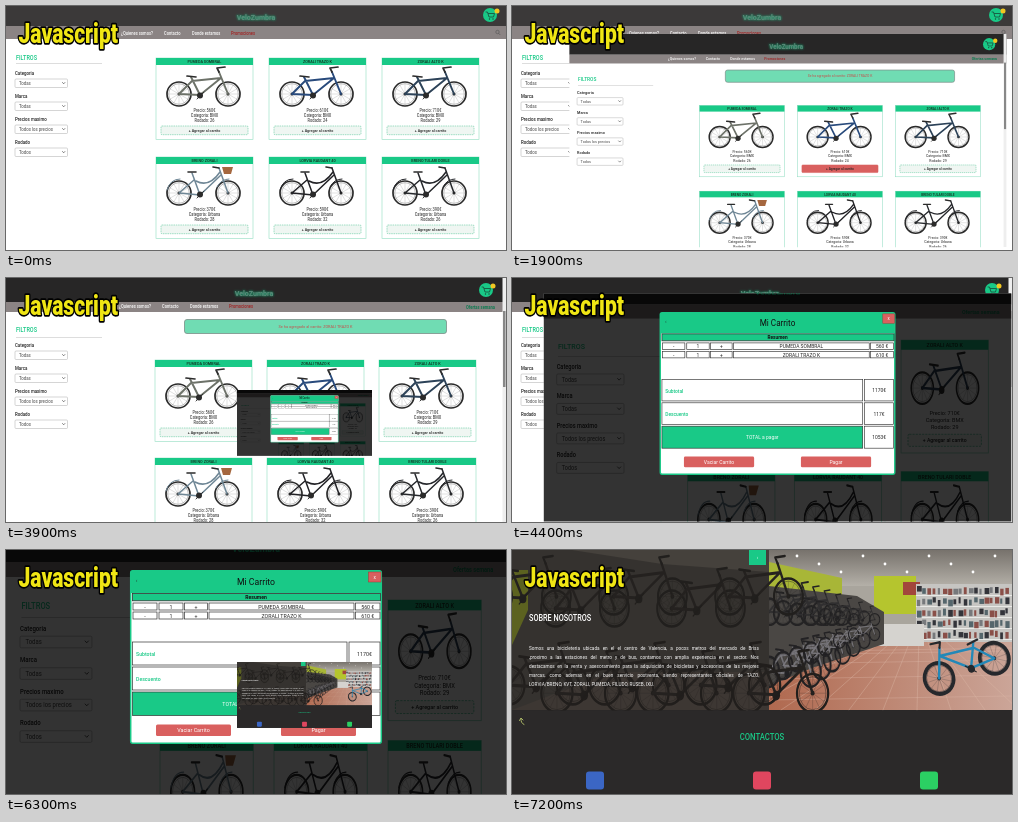
Write an HTML page that moves like this. It is 500 px wide and 244 px high and loops after 8 s.

```html
<!DOCTYPE html>
<html lang="es">
<head>
<meta charset="utf-8">
<title>Javascript</title>
<style>
html, body { margin: 0; width: 100%; height: 100%; overflow: hidden; background: #fff; }
#stage { display: block; width: 100vw; height: 100vh; }
#stage, #stage div { font-family: Roboto, "Liberation Sans", sans-serif; }
.about div { color: #fff; font-size: 5.3px; line-height: 9px; white-space: nowrap; text-align: justify; text-align-last: justify; }
.about div:last-child { text-align-last: left; }
</style>
</head>
<body>
<svg id="stage" viewBox="0 0 500 244"></svg>
<script>
const GREEN = '#19c987', RED = '#d9605f', INK = '#222', CONDENSED = 0.88;
const BRAND = 'VeloZumbra';

const rect = (x, y, w, h, fill, more = '') =>
  `<rect x="${x}" y="${y}" width="${w}" height="${h}" fill="${fill}" ${more}/>`;
const path = (d, stroke, width = 1, fill = 'none') =>
  `<path d="${d}" fill="${fill}" stroke="${stroke}" stroke-width="${width}" stroke-linecap="round" stroke-linejoin="round"/>`;
const shape = (d, fill) => `<path d="${d}" fill="${fill}"/>`;
const circle = (x, y, r, fill, more = '') => `<circle cx="${x}" cy="${y}" r="${r}" fill="${fill}" ${more}/>`;
const text = (x, y, size, str, fill = INK, anchor = 'start', weight = 400) =>
  `<text transform="translate(${x} ${y}) scale(${CONDENSED} 1)" font-size="${size}" fill="${fill}" text-anchor="${anchor}" font-weight="${weight}">${str}</text>`;
const mid = (x, y, size, str, fill, weight) => text(x, y, size, str, fill, 'middle', weight);
const group = (transform, body, more = '') => `<g transform="${transform}" ${more}>${body}</g>`;
const range = (n, f) => Array.from({ length: n }, (_, i) => f(i)).join('');

let seed = 7;
const random = () => (seed = seed * 16807 % 2147483647) / 2147483647;

const items = [
  ['PUMEDA SOMBRAL', 560, 'BMX', 26, '#6d7269'],
  ['ZORALI TRAZO K', 610, 'BMX', 24, '#284a7c'],
  ['ZORALI ALTO K', 710, 'BMX', 29, '#2c4258'],
  ['BRENO ZORALI', 370, 'Urbana', 28, '#6f8796'],
  ['LORVIA RAUDANT 40', 590, 'Urbana', 32, '#222226'],
  ['BRENO TULARI DOBLE', 390, 'Urbana', 26, '#26282c']
];

// Bicycle facing right, about 76 x 40 units
function bike(x, y, color, kind = 'BMX', sx = 1, sy = sx, tyre = '#2b2b2b', tread = 1.7) {
  const city = kind != 'BMX';
  const wheel = cx => circle(cx, 27, 12, 'none', `stroke="${tyre}" stroke-width="${tread}"`) +
    circle(cx, 27, 10.3, 'none', `stroke="${tyre}" stroke-width=".3"`) +
    range(6, i => {
      const a = i * Math.PI / 6, c = 10 * Math.cos(a), s = 10 * Math.sin(a);
      return path(`M${cx - c} ${27 - s}L${cx + c} ${27 + s}`, tyre, 0.15);
    }) + circle(cx, 27, 1.5, tyre);
  const frame = city
    ? path('M13 27L34 29L55 9M13 27L28 14M26 7L34 29M30 15Q43 22 54 6M53 2L62 27', color, 1.5) +
      path('M1 24Q4 13 14 13M51 21Q55 13 63 13', color, 1) +
      path('M53 2L47 1M22 6H30', tyre, 1.6)
    : path('M13 27L34 28L55 11L26 14ZM25 10L34 28M53 5L62 27', color, 1.9) +
      path('M53 5L51 1L59 0M21 9L30 10', tyre, 1.7);
  return group(`translate(${x} ${y}) scale(${sx} ${sy})`,
    wheel(13) + wheel(62) + frame + circle(34, 28.5, 3, tyre) +
    path('M31 32L38 25', tyre, 0.9));
}

function card(x, y, w, n, hot) {
  const [name, price, kind, size, color] = items[n], c = x + w / 2;
  const fit = Math.min(1, (w - 19) / 66), tall = fit < 1 ? 0.95 : 1;
  return rect(x, y, w, 81.5, '#fff', 'stroke="#8fdcc0" stroke-width=".6"') +
    rect(x, y, w, 7, GREEN) + mid(c, y + 5.1, 4.3, name, '#12301f', 500) +
    bike(x + 10 * fit, y + 9, color, kind, fit, tall) +
    (n == 3 ? shape(`M${x + 10 * fit + 56 * fit} ${y + 10}h${11 * fit}l-2 7h${-7 * fit}z`, '#a5673f') : '') +
    mid(c, y + 54.3, 4.5, `Precio: ${price}€`) +
    mid(c, y + 59.4, 4.5, `Categoria: ${kind}`) +
    mid(c, y + 64.4, 4.5, `Rodado: ${size}`) +
    rect(x + 5, y + 68, w - 10, 8.7, hot ? RED : '#eff6f2', `rx="1" stroke="${hot ? RED : '#62c9a0'}" stroke-width=".6" ${hot ? '' : 'stroke-dasharray="1.5 .8"'}`) +
    mid(c, y + 73.9, 4.2, '+ Agregar al carrito', INK, 500);
}

const filters = lineY => text(10, 53.5, 6.3, 'FILTROS', GREEN, 'start', 500) +
  rect(10, lineY, 86, 0.5, '#bbb') +
  ['Categoria', 'Marca', 'Precios maximo', 'Rodado'].map((label, i) => {
    const y = 69 + i * 23;
    return text(9, y, 5, label, INK, 'start', 500) +
      rect(9, y + 4, 52.5, 8.5, '#fff', 'rx="1" stroke="#aaa" stroke-width=".5"') +
      text(13, y + 10, 4.9, ['Todas', 'Todas', 'Todos los precios', 'Todos'][i], '#444') +
      path(`M56.5 ${y + 7.5}l1.2 1.3l1.2 -1.3`, '#333', 0.6);
  }).join('');

const header = (split, bottom, logoX, cartX, cartY, dark) =>
  rect(0, 0, 500, split, dark) + rect(0, split, 500, bottom - split, '#8b8484') +
  `<g filter="url(#glow)">${mid(logoX, split - 6, 8, BRAND, GREEN, 700)}</g>` +
  mid(logoX, split - 6, 8, BRAND, '#5b8a7a', 700) +
  ['¿Quienes somos?', 'Contacto', 'Donde estamos', 'Promociones'].map((s, i) =>
    text([115, 158, 186, 225][i] + logoX - 250, bottom - 4, 4.6, s, i < 3 ? '#fff' : '#a11f1f', 'start', 500)).join('') +
  circle(cartX, cartY, 7, GREEN) +
  path(`M${cartX - 4} ${cartY - 3}h1.5l1.5 5h4.5l1 -3.5h-6`, '#174a38', 0.8) +
  circle(cartX - 0.5, cartY + 4, 0.7, '#174a38') + circle(cartX + 3, cartY + 4, 0.7, '#174a38') +
  circle(cartX + 7, cartY - 4, 2.5, '#f2c722');

function shop() {
  return rect(0, 0, 500, 244, '#fff') + header(20, 33, 250, 484, 9, '#3b3939') +
    circle(491.5, 26, 1.7, 'none', 'stroke="#555" stroke-width=".6"') + path('M492.8 27.5l1.2 1.2', '#555', 0.6) +
    filters(57) + range(6, i => card(150 + i % 3 * 113, i < 3 ? 52 : 151, 97, i));
}

function added() {
  return rect(0, 0, 500, 244, '#fff') + header(24, 34, 248, 480, 12, '#272626') +
    text(460, 30.5, 4.6, 'Ofertas semana', '#0d7a50', 'start', 700) +
    rect(496.5, 0, 3.5, 244, '#eee') + rect(497, 33, 2.5, 76, '#888') +
    rect(178.5, 41.5, 262, 14, '#70dcb3', 'rx="2.5" stroke="#7c8f88" stroke-width=".8"') +
    mid(309.5, 50, 4.4, `Se ha agregado al carrito: ${items[1][0]}`, '#c4504c') +
    filters(59) + range(6, i => card(149 + i % 3 * 112, i < 3 ? 82 : 180, 97, i, i == 1));
}

function cart() {
  const cell = (x, y, w, h, str, size, fill = '#fff', ink = INK) =>
    rect(x, y, w, h, fill, 'stroke="#333" stroke-width=".7"') + mid(x + w / 2, y + h / 2 + size * 0.35, size, str, ink);
  const row = (y, n) => [[127, 24, '-'], [153, 24, '1'], [178.5, 23, '+'], [203, 145, items[n][0]], [349.5, 24.5, items[n][1] + ' €']]
    .map(([x, w, s]) => cell(x, y, w, 7, s, 6)).join('');
  const sum = (y, label, value) => cell(126.5, y, 214.5, 23, '', 6) +
    text(130, y + 14, 5.9, label, GREEN, 'start', 500) + cell(343, y, 31, 23, value, 6);
  const button = (x, s) => rect(x, 174.5, 75, 11.5, RED, 'rx="1.5"') + mid(x + 37.5, 182.4, 6.1, s, '#fff');
  const page = rect(0, 0, 500, 244, '#fff') + rect(0, 0, 500, 12, '#272626') + rect(0, 12, 500, 15, '#8b8484') +
    mid(250, 2, 10, BRAND, GREEN, 700) + text(447, 22, 6.4, 'Ofertas semana', '#0d7a50', 'start', 700) +
    group('translate(1.7 -13.8) scale(1.37)', filters(59)) +
    range(6, i => group(`translate(${154 + i % 3 * 114} ${i < 3 ? 50 : 190.5}) scale(1.48)`, card(0, 0, 63, i)));
  return page + rect(0, 0, 500, 244, '#000', 'opacity=".8"') +
    rect(124.7, 20.7, 250.6, 172.6, '#fff', `rx="2" stroke="${GREEN}" stroke-width="1.5"`) +
    rect(125, 21, 250, 22, GREEN) + mid(250, 35, 9.9, 'Mi Carrito', '#111') + text(130, 32, 5, '‹') +
    rect(362.5, 22, 12.5, 10, RED, 'stroke="#a33" stroke-width=".5"') + mid(368.7, 29, 5.5, 'x', '#fff') +
    rect(126.5, 43.4, 248, 7.4, GREEN, 'stroke="#333" stroke-width=".8"') + mid(250, 49.1, 5.8, 'Resumen', '#111', 700) +
    row(53, 0) + row(62, 1) + sum(92, 'Subtotal', '1170€') + sum(117, 'Descuento', '117€') +
    cell(126.5, 142, 214.5, 23.5, 'TOTAL a pagar', 6, GREEN, '#fff') + cell(343, 142, 31, 23.5, '1053€', 6) +
    button(150, 'Vaciar Carrito') + button(275, 'Pagar');
}

function about() {
  const left = rect(0, 0, 257, 160, '#35322f') + shape('M0 20H16V60L0 95Z', '#5c6220') +
    shape('M60 0H257V22L150 14Z', '#45413c') + shape('M0 160L100 122H257V160Z', '#3d3733') +
    range(5, i => bike(-30 + i * 58, 6 + i % 2 * 12, '#24211f', 'BMX', 1.2, 1.5, '#211f1d')) +
    range(6, i => bike(-20 + i * 48, 92 + i % 2 * 8, '#24211f', 'BMX', 1.3, 1.6, '#211e1c'));
  const right = rect(257, 0, 243, 160, '#a9a59d') + rect(257, 0, 243, 36, 'url(#ceiling)') +
    shape('M257 12L330 28V45L257 42Z', '#a8b637') + rect(362, 26, 42, 38, '#b5c52e') + rect(391, 32, 17, 13, '#a2463c') +
    range(10, i => circle(285 + i * 22, 6 + i % 3 * 8, 1.4, '#fff')) +
    shape('M257 118L350 84L500 90V160H257Z', 'url(#floor)') +
    range(9, i => path(`M${372 + i * 7} 86L${235 + i * 34} 160`, '#dcb8a8', 0.4)) +
    range(5, i => path(`M257 ${102 + i * i * 3}L500 ${98 + i * i * 3}`, '#dcb8a8', 0.35)) +
    rect(404, 34, 96, 58, '#c6c5c2') +
    range(5, r => rect(404, 45 + r * 11, 96, 1, '#e9e9e6') +
      range(18, i => rect(405 + i * 5.2, 36 + r * 11 + random() * 3, 2 + random() * 3, 5 + random() * 2, ['#33343a', '#77797c', '#8a4f48', '#55666c'][random() * 4 | 0]))) +
    rect(362, 74, 50, 22, '#d5d3cf') + shape('M257 36L345 46L372 62V94L300 118L257 136Z', '#4a4744') +
    range(7, i => bike(246 + i * 15, 32 + i * 4, '#302f30', 'BMX', 0.85 - i * 0.07, 1.1 - i * 0.1, '#242324', 2.2)) +
    range(7, i => bike(246 + i * 15, 88 - i * 3, '#77757a', 'BMX', 0.85 - i * 0.07, 1.25 - i * 0.12, '#232224', 2.2)) +
    group('translate(485 70) rotate(-20)', bike(0, 0, '#2388b8', 'BMX', -1.2, 1.3, '#26282c', 3));
  const lines = [
    'Somos una bicicleteria ubicada en el el centro de Valencia, a pocos metros del mercado de Brisa',
    ',proximo a las estaciones del metro y de bus, contamos con amplia experiencia en el sector. Nos',
    'destacamos en la venta y asesoramiento para la adquisición de bicicletas y accesorios de las mejores',
    'marcas, como ademas en el buen servicio postventa, siendo representantes oficiales de TAZO,',
    'LORVIA/BRENO, KVT, ZORALI, PUMEDA, FILUDO, RUSEB, IXU.'
  ];
  return rect(0, 0, 500, 244, '#2b2929') + right + left + rect(0, 160.5, 500, 83.5, '#2b2929') +
    rect(237, 0, 17, 15, GREEN) + mid(245.5, 9, 5, '‹', '#fff') +
    text(17, 71, 8.3, 'SOBRE NOSOTROS', '#fff', 'start', 500) +
    group(`translate(17 93.5) scale(${CONDENSED} 1)`,
      `<foreignObject width="${230 / CONDENSED}" height="50"><div class="about">${lines.map(s => `<div>${s}</div>`).join('')}</div></foreignObject>`) +
    path('M7.5 170.5L9 168L11 170M9 168.5Q8.5 173 12 174.5', '#a9b565', 1) +
    mid(250, 190, 8.8, 'CONTACTOS', GREEN, 500) +
    rect(74, 221.5, 18, 18, '#3b66c4', 'rx="3"') + rect(241, 221.5, 18, 18, '#e0465f', 'rx="3"') + rect(408, 221.5, 18, 18, '#2bcf63', 'rx="3"');
}

const scenes = [[0, shop], [1500, added], [3900, cart], [6300, about]];
const stage = document.getElementById('stage');
stage.innerHTML = `<defs>
  <filter id="glow" x="-30%" y="-80%" width="160%" height="260%"><feGaussianBlur stdDeviation="1"/></filter>
  <linearGradient id="ceiling" x2="0" y2="1"><stop stop-color="#77726c"/><stop offset="1" stop-color="#b4b0a8"/></linearGradient>
  <linearGradient id="floor" x2="1" y2="0"><stop stop-color="#b0694f"/><stop offset="1" stop-color="#cba598"/></linearGradient>
</defs>` +
  scenes.map(([, draw]) => `<svg class="scene" viewBox="0 0 500 244" preserveAspectRatio="none">${draw()}</svg>`).join('') +
  `<text transform="translate(12.5 37) scale(.74 1)" font-size="28.5" font-weight="900" fill="#f0e614"
    stroke="#000" stroke-width="3.5" stroke-linejoin="round" paint-order="stroke">Javascript</text>`;
const views = [...stage.querySelectorAll('.scene')];

// Each new scene grows from a thumbnail in tenth-of-a-second steps
function place(view, start, t) {
  view.style.display = t < start ? 'none' : '';
  const rest = start ? 1 - Math.min(1, Math.max(0, (t - start) / 900)) : 0;
  const scale = 1 - 0.73 * rest ** 3, shift = rest ** 3 * (2 - rest);
  const box = { x: 231 * shift, y: 112 * shift, width: 500 * scale, height: 244 * scale };
  for (const key in box) view.setAttribute(key, box[key]);
}

function tick() {
  const t = Math.floor(performance.now() % 8000 / 100) * 100;
  views.forEach((view, i) => place(view, scenes[i][0], t));
  requestAnimationFrame(tick);
}
tick();
</script>
</body>
</html>
```
